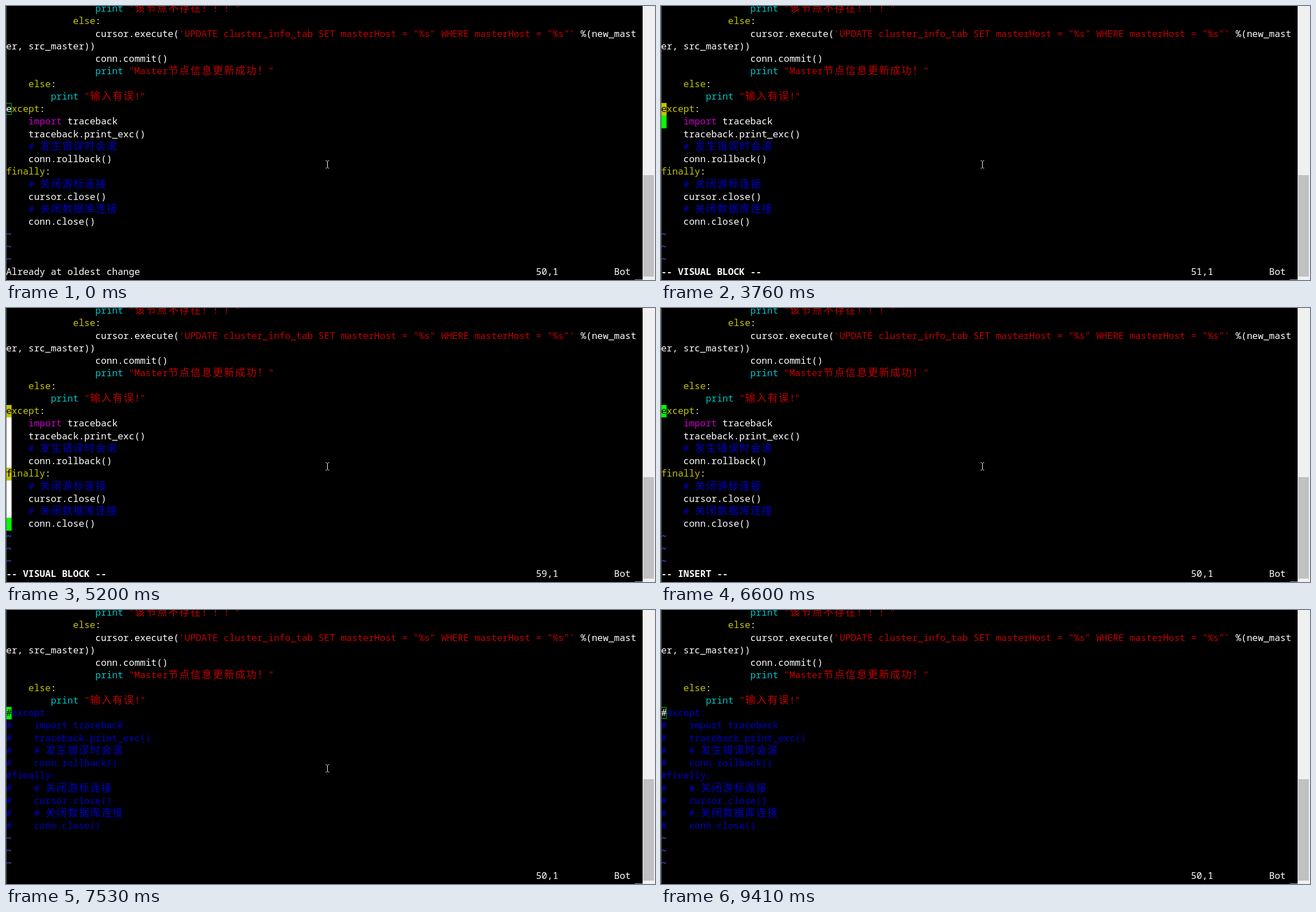
Write an HTML page that moves like this. It is 1152x486 px and loops after 9.51 s.

```html
<!DOCTYPE html>
<html lang="zh-CN">
<head>
<meta charset="utf-8">
<style>
html, body { margin: 0; width: 100%; height: 100%; overflow: hidden; background: #000; }
svg { display: block; }
text { font: 16.5px "Noto Sans Mono", "DejaVu Sans Mono", monospace; white-space: pre; font-variant-ligatures: none; }
text.wide { font: 300 18px "Noto Sans CJK SC", "Noto Sans CJK", sans-serif; letter-spacing: 1.8px; }
text.bold { font-weight: 700; }
</style>
</head>
<body>
<svg width="1152" height="486" viewBox="0 0 1152 486">
  <rect width="1152" height="486" fill="#000"/>
  <g id="editor"></g>
  <rect width="1" height="486" fill="#606060"/>
  <rect x="1116" y="485" width="14" height="1" fill="#a0a0a0"/>
  <rect x="1130" width="22" height="486" fill="#f0f0f0"/>
  <rect x="1131" y="300" width="19" height="180" fill="#c1c1c1"/>
  <path id="pointer" d="M-3 -6.5H-1M1 -6.5H3M0 -6V6M-3 6.5H-1M1 6.5H3" stroke="#fff" fill="none"/>
</svg>
<script>
(() => {
const LOOP = 9510, CW = 9.9, RH = 22.25, FIRST = 8, LAST = 17, GREEN = '#00ff00';
const COLORS = { w: '#fff', y: '#c4c400', c: '#00c4c4', r: '#c40000', m: '#c400c4', b: '#0000c4', t: '#5c5cff' };

// Each "|" starts a run; its first letter is the colour.
const LINES = [
  '|w                |cprint |r"该节点不存在！！！"',
  '|w            |yelse|w:',
  `|w                cursor.execute(|r'UPDATE cluster_info_tab SET masterHost = "%s" WHERE masterHost = "%s"'|w %(new_mast`,
  '|wer, src_master))',
  '|w                conn.commit()',
  '|w                |cprint |r"Master节点信息更新成功！"',
  '|w    |yelse|w:',
  '|w        |cprint |r"输入有误!"',
  '|yexcept|w:',
  '|w    |mimport|w traceback',
  '|w    traceback.print_exc()',
  '|w    |b# 发生错误时会滚',
  '|w    conn.rollback()',
  '|yfinally|w:',
  '|w    |b# 关闭游标连接',
  '|w    cursor.close()',
  '|w    |b# 关闭数据库连接',
  '|w    conn.close()',
  '|t~', '|t~', '|t~'
];

// Editor states: each entry changes some fields from its time on.
const EDITS = [
  [0, { line: 50, col: 0, sel: false, hashed: 0, hollow: true, msg: 'Already at oldest change', bold: false, ruler: true }],
  [300, { hollow: false }],
  [1800, { sel: true, msg: '-- VISUAL BLOCK --', bold: true }],
  ...[3760, 3880, 4130, 4250, 4410, 4680, 4800, 4920, 5200].map((t, i) => [t, { line: 51 + i }]),
  [6600, { line: 50, sel: false, msg: '-- INSERT --' }],
  [6970, { col: 1, hashed: 1 }],
  [7380, { col: 0, msg: '', ruler: false }],
  [7530, { hashed: LAST - FIRST + 1, ruler: true }],
  [9410, { hollow: true }]
];

// Pointer jumps: time, x, y.
const JUMPS = [[0, 570.5, 281], [8370, 737.5, 289], [8490, 950.5, 362], [8620, 1084.5, 444],
  [8760, 1085.5, 466], [8880, 1085.5, 484], [9030, 1085.5, 510]];

const editor = document.getElementById('editor');
const pointer = document.getElementById('pointer');
const rowTop = row => RH * row - 6;
const esc = s => s.replace(/&/g, '&amp;').replace(/</g, '&lt;');
const width = s => [...s].reduce((n, c) => n + (c >= '\u3000' ? 2 : 1), 0);
const runsOf = line => line.split('|').slice(1).map(s => [s[0], s.slice(1)]);

function box(row, col, fill) {
  const x = Math.max(1, col * CW), y = Math.round(rowTop(row));
  const h = Math.round(rowTop(row + 1)) - y;
  return `<rect x="${x}" y="${y}" width="${(col + 1) * CW - x}" height="${h}" fill="${fill}"/>`;
}

function run(row, col, str, fill, cls = '') {
  let out = '';
  for (const part of str.match(/[\u3000-\uffff]+|[^\u3000-\uffff]+/g) || []) {
    const wide = part >= '\u3000';
    const lead = wide ? 0 : part.length - part.trimStart().length;
    const x = (col + lead) * CW + (wide ? 0.9 : 0.2);
    out += `<text x="${x.toFixed(2)}" y="${rowTop(row) + 16}" fill="${fill}" class="${wide ? 'wide' : cls}">${esc(part.slice(lead))}</text>`;
    col += width(part);
  }
  return out;
}

function lineRuns(row, s) {
  const runs = runsOf(LINES[row]);
  if (row < FIRST || row >= FIRST + s.hashed) return runs;
  return [['b', '#' + runs.map(r => r[1]).join('')]];
}

function render(s) {
  const cur = s.line - 50 + FIRST;
  let out = '';
  for (let row = 0; row < LINES.length; row++) {
    const runs = lineRuns(row, s);
    let col = 0;
    for (const [color, str] of runs) {
      out += run(row, col, str, COLORS[color]);
      col += width(str);
    }
    const here = row === cur, picked = s.sel && row >= FIRST && row < cur;
    if (!here && !picked) continue;
    const at = here ? s.col : 0;
    const ch = runs.map(r => r[1]).join('')[at];
    const hollow = here && s.hollow;
    out += box(row, at, hollow ? '#000' : here ? GREEN : COLORS[runs[0][0]]);
    out += run(row, at, ch, hollow ? '#fff' : '#000');
    if (hollow) out += `<rect x=".5" y="${Math.round(rowTop(row)) + .5}" width="9" height="20" fill="none" stroke="#00c800"/>`;
  }
  out += run(21, 0, s.msg, '#fff', s.bold ? 'bold' : '');
  if (s.ruler) out += run(21, 95, `${s.line},${s.col + 1}`, '#fff') + run(21, 109, 'Bot', '#fff');
  editor.innerHTML = out;
}

let shown = 0;
function draw(t) {
  const past = EDITS.filter(e => e[0] <= t);
  if (past.length !== shown) {
    shown = past.length;
    render(Object.assign({}, ...past.map(e => e[1])));
  }
  const [, x, y] = JUMPS.filter(p => p[0] <= t).pop();
  pointer.setAttribute('transform', `translate(${x} ${y})`);
}

const start = performance.now();
function tick() {
  draw((performance.now() - start) % LOOP);
  requestAnimationFrame(tick);
}
tick();
})();
</script>
</body>
</html>
```
